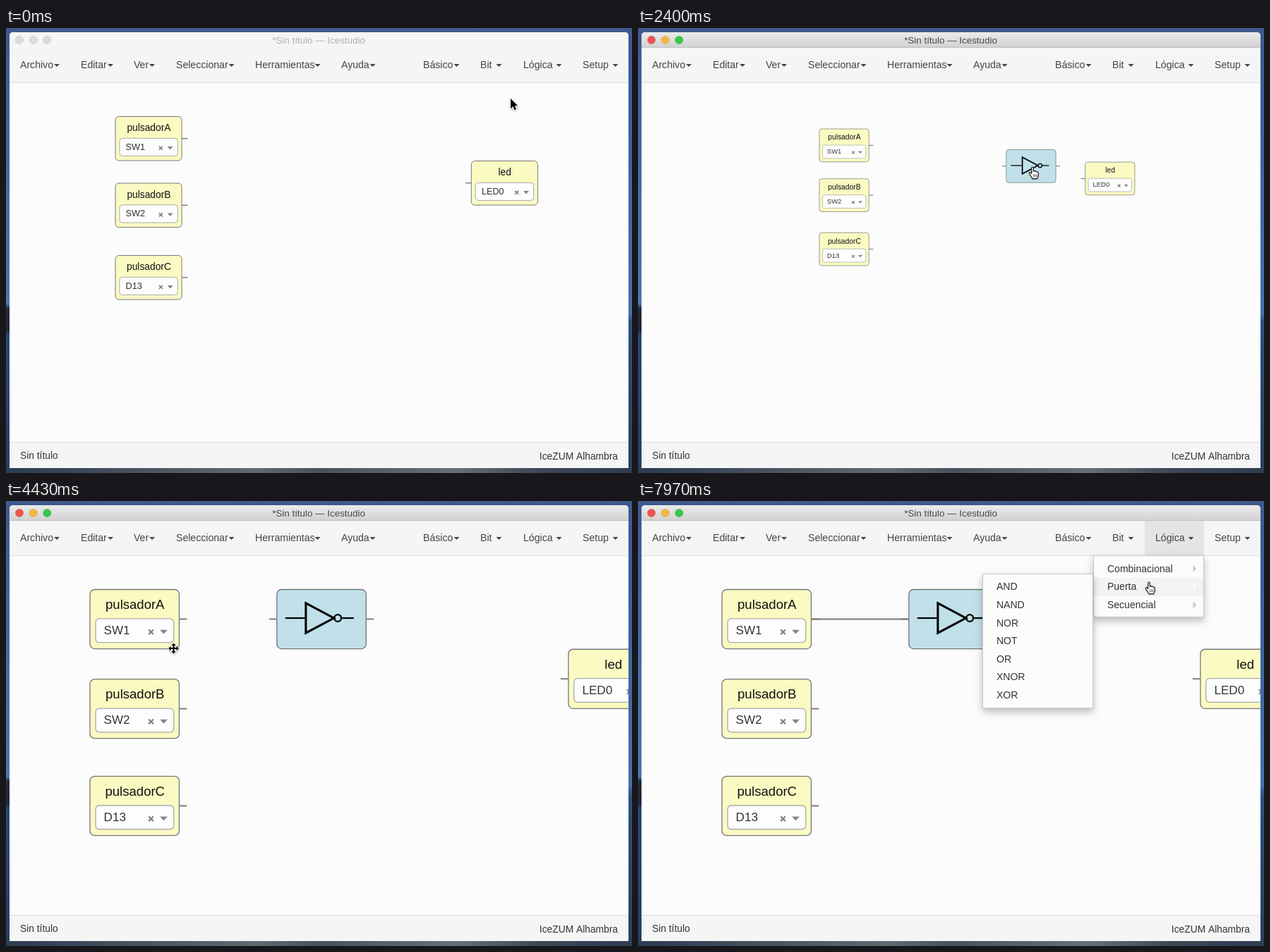
An HTML page with a canvas for the animation above (8 s loop, 887 px wide and 631 px high).

```html
<!DOCTYPE html>
<html lang="es">
<head>
<meta charset="utf-8">
<title>Icestudio</title>
<style>
html, body { margin: 0; width: 100%; height: 100%; overflow: hidden; }
canvas { display: block; width: 887px; height: 631px; }
</style>
</head>
<body>
<canvas id="stage" width="887" height="631"></canvas>
<script>
const ctx = document.getElementById('stage').getContext('2d');
const LOOP = 8000;
const FONT = '"Liberation Sans", Arial, sans-serif';
const GREY = '#777';

// Keyframes: [time, ...values]
const VIEW = [ // scale, x, y of the diagram's first block
  [0, .985, 155, 125.5], [2140, .985, 155, 125.5], [2400, .7365, 256.5, 143],
  [2440, .7025, 274, 146.5], [4040, .7025, 274, 146.5], [4290, 1.324, 119, 125.5]
];
const GATE = [[0, 320, 40], [1800, 320, 40], [2050, 360, 40], [2600, 360, 40], [3230, 200, 0]];
const POINTER = [
  [0, 715, 100], [130, 715, 100], [550, 758, 56], [720, 758, 56], [1050, 717, 114],
  [1330, 717, 114], [1650, 520, 196], [1800, 520, 196], [2050, 559, 197], [2450, 559, 197],
  [2600, 562, 199], [3230, 449.5, 171.5], [4270, 449.5, 171.5], [4430, 237.5, 209],
  [4900, 237.5, 209], [5600, 246.5, 174.5], [6000, 246.5, 174.5], [6500, 378, 168],
  [6650, 378, 168], [7200, 758, 56], [7400, 758, 56], [7750, 724, 115]
];
const POINTER_KIND = [
  [0, 'arrow'], [450, 'hand'], [2500, 'move'], [4310, 'arrow'], [4390, 'move'],
  [6040, 'arrow'], [6450, 'move'], [6850, 'arrow'], [7120, 'hand']
];
const ACTIVE_AT = 600, PLACED_AT = 1760, WIRE_AT = 6000, JOINED_AT = 6500, REOPEN_AT = 7300;

const MENU = [ // label, text x, caret centre
  ['Archivo', 20, 72], ['Editar', 106, 148], ['Ver', 181, 207], ['Seleccionar', 241, 319.5],
  ['Herramientas', 353, 441.5], ['Ayuda', 475, 519.5], ['Básico', 591, 638.5],
  ['Bit', 672, 698.5], ['Lógica', 733, 783.5], ['Setup', 817, 863.5]
];
const LOGIC = ['Combinacional', 'Puerta', 'Secuencial'];
const GATES = ['AND', 'NAND', 'NOR', 'NOT', 'OR', 'XNOR', 'XOR'];
const PINS = [['pulsadorA', 'SW1', 0, 0], ['pulsadorB', 'SW2', 0, 96], ['pulsadorC', 'D13', 0, 200], ['led', 'LED0', 512, 64]];
const W = 95.5, H = 63.5, PORT_Y = 31.7, ROW = 25.65;

const linear = u => u;
const smooth = u => u * u * (3 - 2 * u);

function track(keys, t, ease) {
  let i = keys.length - 1;
  while (i > 0 && keys[i][0] > t) i--;
  const a = keys[i], b = keys[i + 1] || a;
  const u = a === b ? 0 : ease((t - a[0]) / (b[0] - a[0]));
  return a.slice(1).map((v, k) => v + (b[k + 1] - v) * u);
}

function latest(keys, t) {
  return keys.filter(k => k[0] <= t).pop()[1];
}

function rect(x, y, w, h, fill) {
  ctx.fillStyle = fill;
  ctx.fillRect(x, y, w, h);
}

function gradient(x1, y1, stops) {
  const g = ctx.createLinearGradient(0, 0, x1, y1);
  stops.forEach(([p, c]) => g.addColorStop(p, c));
  return g;
}

function text(s, x, y, size, color = '#333', align = 'left') {
  ctx.font = `${size}px ${FONT}`;
  ctx.textAlign = align;
  ctx.fillStyle = color;
  ctx.fillText(s, x, y);
}

function poly(points, fill) {
  ctx.beginPath();
  points.forEach(([x, y]) => ctx.lineTo(x, y));
  ctx.closePath();
  ctx.fillStyle = fill;
  ctx.fill();
}

function line(x1, y1, x2, y2, width, color = GREY) {
  ctx.beginPath();
  ctx.moveTo(x1, y1);
  ctx.lineTo(x2, y2);
  ctx.lineWidth = width;
  ctx.strokeStyle = color;
  ctx.stroke();
}

function box(x, y, w, h, r, fill, stroke, width = 1) {
  ctx.beginPath();
  ctx.roundRect(x, y, w, h, r);
  ctx.fillStyle = fill;
  ctx.fill();
  if (!stroke) return;
  ctx.strokeStyle = stroke;
  ctx.lineWidth = width;
  ctx.stroke();
}

function caret(x, y, w, h, color) {
  poly([[x - w / 2, y], [x + w / 2, y], [x, y + h]], color);
}

function desktop() {
  rect(0, 0, 887, 631, gradient(0, 631, [
    [0, '#40598f'], [.3, '#44699f'], [.62, '#4a78ac'], [.63, '#252c38'],
    [.68, '#20293a'], [.69, '#2c4a78'], [.97, '#274068'], [1, '#2d3b4c']
  ]));
  rect(882, 0, 5, 631, gradient(0, 631, [
    [0, '#40598f'], [.3, '#3f629b'], [.64, '#4672a8'], [.66, '#2f5080'], [1, '#2b405c']
  ]));
  rect(0, 624, 887, 7, gradient(887, 0, [
    [0, '#2b3b50'], [.2, '#46525f'], [.4, '#5f6a72'], [.5, '#46525e'], [.72, '#667079'], [.85, '#3c4856'], [1, '#2d3d50']
  ]));
}

function frame(active, open) {
  box(5, 6, 877, 618, [5, 5, 0, 0], '#fcfcfd');
  const bar = active ? gradient(0, 28, [[.2, '#ececec'], [1, '#d1d1d1']]) : '#f5f5f5';
  box(5, 6, 877, 22, [5, 5, 0, 0], bar);
  if (active) rect(5, 27, 877, 1, '#bdbdbd');
  ['#ee5350', '#f3b73e', '#36c84b'].forEach((c, i) => {
    ctx.beginPath();
    ctx.arc(19 + 19.6 * i, 17, 5.7, 0, 7);
    ctx.fillStyle = active ? c : '#dcdcdc';
    ctx.fill();
    ctx.lineWidth = .7;
    ctx.strokeStyle = 'rgba(0,0,0,.12)';
    ctx.stroke();
  });
  text('*Sin título — Icestudio', 443, 21.5, 13.4, active ? '#484848' : '#b0b0b0', 'center');

  rect(5, 28, 877, 49, '#f5f5f6');
  rect(5, 77, 877, 1, '#e0e0e0');
  if (open) rect(718, 28, 84, 49, '#e4e4e6');
  MENU.forEach(([label, x, cx]) => {
    text(label, x, 57, 14.1, '#444');
    caret(cx, 51, 8, 4, '#444');
  });

  rect(5, 587, 877, 37, '#f5f5f5');
  rect(5, 587, 877, 1, '#e0e0e0');
  text('Sin título', 20, 611, 13.8);
  text('IceZUM Alhambra', 867, 612, 13.8, '#333', 'right');
}

function pin([name, value, x, y], hovered) {
  const right = x === 0;
  const px = right ? x + W : x;
  line(px, y + PORT_Y, px + (right ? 8.3 : -8.3), y + PORT_Y, 1.4, hovered ? '#ccc' : GREY);
  box(x, y, W, H, 5, '#fafac2', GREY);
  text(name, x + W / 2 + .4, y + 20.8, 14, '#111', 'center');
  box(x + 6, y + 31.3, 83.7, 25.5, 4, '#fdfdfd', '#aaa');
  text(value, x + 14.8, y + 48, 12.9);
  const cx = x + 65.3, cy = y + 45.5, d = 2.5;
  line(cx - d, cy - d, cx + d, cy + d, 1.7, '#808080');
  line(cx - d, cy + d, cx + d, cy - d, 1.7, '#808080');
  caret(x + 78.9, y + 43.2, 8, 4.4, '#858585');
}

function notGate(x, y) {
  line(x - 8.3, y + PORT_Y, x, y + PORT_Y, 1.4);
  line(x + W, y + PORT_Y, x + W + 8.3, y + PORT_Y, 1.4);
  box(x, y, W, H, 5, '#c1e0ea', '#6f7779');
  const m = y + 30.6;
  line(x + 9, m, x + 31, m, 1.7, '#000');
  line(x + 69, m, x + 82.3, m, 1.7, '#000');
  ctx.lineWidth = 2.3;
  ctx.beginPath();
  ctx.moveTo(x + 31, m - 16);
  ctx.lineTo(x + 31, m + 16);
  ctx.lineTo(x + 61, m);
  ctx.closePath();
  ctx.stroke();
  ctx.lineWidth = 1.8;
  ctx.beginPath();
  ctx.arc(x + 65.2, m, 3.7, 0, 7);
  ctx.stroke();
}

function diagram(t, mx, my) {
  const [s, ox, oy] = track(VIEW, t, linear);
  ctx.save();
  ctx.beginPath();
  ctx.rect(5, 78, 877, 509);
  ctx.clip();
  ctx.translate(ox, oy);
  ctx.scale(s, s);
  const [gx, gy] = track(GATE, t, smooth);
  if (t >= JOINED_AT) line(W, PORT_Y, gx, PORT_Y, 1.5);
  else if (t >= WIRE_AT) line(W, PORT_Y, Math.max(W + 8, (mx - ox) / s), (my - oy) / s, 1.5);
  PINS.forEach((p, i) => pin(p, i === 0 && t > 5550 && t < WIRE_AT));
  if (t >= PLACED_AT) {
    // Grid snapping while the block is carried
    notGate(Math.round(gx / 8) * 8, Math.round(gy / 8) * 8);
  }
  ctx.restore();
}

function panel(x, y, w, h) {
  ctx.save();
  ctx.shadowColor = 'rgba(0,0,0,.26)';
  ctx.shadowBlur = 10;
  ctx.shadowOffsetY = 5;
  rect(x, y, w, h, '#fcfcfc');
  ctx.restore();
  ctx.strokeStyle = '#c8c8c8';
  ctx.lineWidth = 1;
  ctx.strokeRect(x + .5, y + .5, w - 1, h - 1);
}

function menus(mx, my, sub) {
  const inSub = sub && mx < 645;
  const row = Math.floor((my + 5 - 83.5) / ROW);
  const hot = sub ? 1 : row;
  panel(645, 77, 157, 88);
  LOGIC.forEach((label, i) => {
    const y = 83.5 + ROW * i;
    if (i === hot) rect(646, y, 155, ROW, '#f3f3f4');
    text(label, 665, y + 17.2, 14);
    poly([[786.5, y + 7.5], [791.5, y + 12.5], [786.5, y + 17.5]], i === hot ? '#fff' : '#ccc');
  });
  if (!sub) return;
  panel(488, 103, 157, 191);
  GATES.forEach((label, i) => {
    const y = 109 + ROW * i;
    if (inSub && row - 1 === i) rect(489, y, 155, ROW, '#f3f3f4');
    text(label, 508, y + 17.2, 14);
  });
}

const HAND = new Path2D('M3.5 1.2c0-1.6 2.6-1.6 2.6 0v5c.6-1 2.4-.8 2.6.3 .8-.7 2.2-.3 2.3.8 .9-.5 2 .1 2 1.3v3c0 2-1 3-1.5 5h-7c-.5-2-2-3.5-3.3-5.5-1-1.6-1.6-2.6-.8-3.2 .9-.6 2 .2 3.1 1.6z');
const ARROW = new Path2D('M0 0V14.2L3.3 11.2L5.5 16.3L8 15.2L5.8 10.3H10.2Z');
const CROSS = new Path2D();
for (let k = 0; k < 4; k++) {
  const arm = new Path2D('M-1.1 0V-4H-3.4L0-7.4L3.4-4H1.1V0Z');
  CROSS.addPath(arm, new DOMMatrix().rotate(90 * k));
}

function pointer(kind, x, y) {
  ctx.save();
  ctx.translate(x, y);
  ctx.lineJoin = 'round';
  ctx.shadowColor = 'rgba(0,0,0,.35)';
  ctx.shadowBlur = 3;
  ctx.shadowOffsetY = 1;
  if (kind === 'hand') {
    ctx.translate(-4.8, 0);
    ctx.fillStyle = '#fff';
    ctx.fill(HAND);
    ctx.shadowColor = 'transparent';
    ctx.strokeStyle = '#222';
    ctx.lineWidth = 1.2;
    ctx.stroke(HAND);
    [6.2, 8.4, 10.6].forEach(fx => line(fx, 10.5, fx, 14, .9, '#444'));
  } else {
    const shape = kind === 'arrow' ? ARROW : CROSS;
    ctx.strokeStyle = '#fff';
    ctx.lineWidth = 2;
    ctx.stroke(shape);
    ctx.shadowColor = 'transparent';
    ctx.fillStyle = '#000';
    ctx.fill(shape);
  }
  ctx.restore();
}

function draw(t) {
  const [mx, my] = track(POINTER, t, smooth);
  const first = t >= ACTIVE_AT && t < PLACED_AT;
  const open = first || t >= REOPEN_AT;
  desktop();
  frame(t >= ACTIVE_AT, open);
  diagram(t, mx, my);
  if (open) menus(mx, my, first ? t > 970 : t > 7660);
  pointer(latest(POINTER_KIND, t), mx, my);
}

const start = performance.now();
function tick() {
  draw((performance.now() - start) % LOOP);
  requestAnimationFrame(tick);
}
tick();
</script>
</body>
</html>
```
